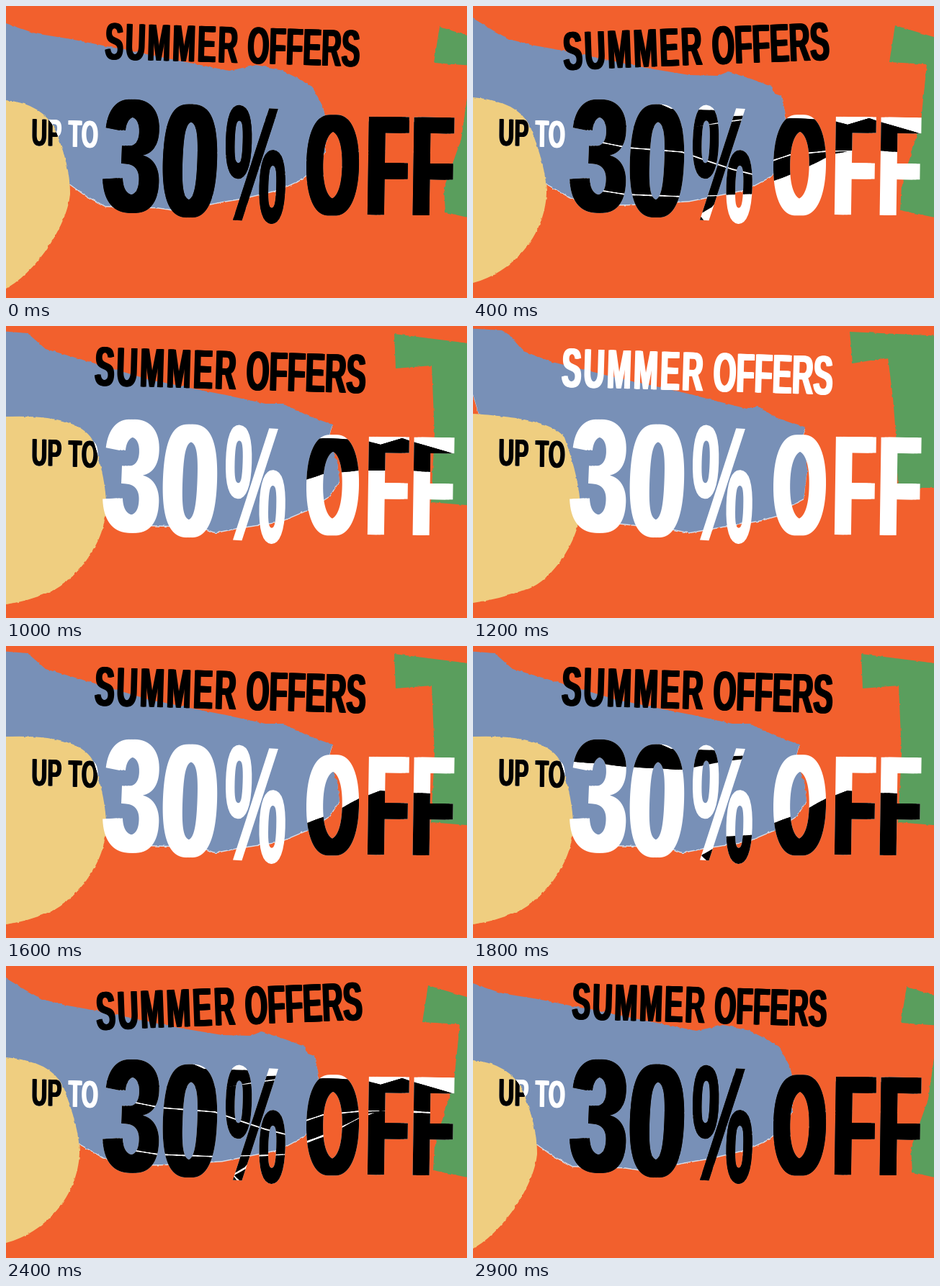
These frames come from a looping animation (640 by 406 pixels, 3000 ms). An HTML page without scripts:

```html
<!DOCTYPE html>
<html lang="en">
<head>
<meta charset="utf-8">
<title>Summer offers</title>
<style>
  html, body { margin: 0; height: 100%; overflow: hidden; background: #f2602d; }
  svg { display: block; width: 100vw; height: 100vh; }
  text { font-family: "Liberation Sans", Arial, sans-serif; font-weight: 700; fill: currentColor; }
  .black { color: #000; }
  .white { color: #fff; }
  .blue { fill: #7890b7; }
  .yellow { fill: #efce80; }
  .green { fill: #5a9e5d; }
  .edge { fill: #d9dde8; }

  .pose, .strip, .solid { visibility: hidden; animation: 3s step-end infinite; }

  /* paper poses: out to the right, then back */
  .p1 { animation-name: p1; }
  .p2 { animation-name: p2; }
  .p3 { animation-name: p3; }
  .p4 { animation-name: p4; }
  .p5 { animation-name: p5; }
  @keyframes p1 { 0%, 86.66% { visibility: visible } 6.66% { visibility: hidden } }
  @keyframes p2 { 0%, 20%, 86.66% { visibility: hidden } 6.66%, 73.33% { visibility: visible } }
  @keyframes p3 { 0%, 33.33%, 73.33% { visibility: hidden } 20%, 66.66% { visibility: visible } }
  @keyframes p4 { 0%, 40%, 66.66% { visibility: hidden } 33.33%, 53.33% { visibility: visible } }
  @keyframes p5 { 0%, 53.33% { visibility: hidden } 40% { visibility: visible } }

  /* black strips of the big lettering: torn off, then put back */
  .solid { animation-name: solid; }
  .a { animation-name: a; }
  .b { animation-name: b; }
  .c { animation-name: c; }
  .d { animation-name: d; }
  .e { animation-name: e; }
  .f { animation-name: f; }
  .g { animation-name: g; }
  .h { animation-name: h; }
  @keyframes solid { 0%, 96.66% { visibility: visible } 6.66% { visibility: hidden } }
  @keyframes a { 0%, 60% { visibility: visible } 20% { visibility: hidden } }
  @keyframes b { 0%, 80% { visibility: visible } 30% { visibility: hidden } }
  @keyframes c { 0%, 73.33% { visibility: visible } 26.66% { visibility: hidden } }
  @keyframes d { 0%, 66.66% { visibility: visible } 33.33% { visibility: hidden } }
  @keyframes e { 0%, 56.66% { visibility: visible } 10% { visibility: hidden } }
  @keyframes f { 0%, 76.66% { visibility: visible } 40% { visibility: hidden } }
  @keyframes g { 0%, 73.33% { visibility: visible } 20% { visibility: hidden } }
  @keyframes h { 0%, 53.33% { visibility: visible } 13.33% { visibility: hidden } }
</style>
</head>
<body>
<svg viewBox="0 0 640 406">
  <defs>
    <filter id="torn" filterUnits="userSpaceOnUse" x="-20" y="-20" width="680" height="446" color-interpolation-filters="sRGB">
      <feTurbulence type="fractalNoise" baseFrequency=".14" numOctaves="2" seed="4"/>
      <feDisplacementMap in="SourceGraphic" scale="3" xChannelSelector="R" yChannelSelector="G"/>
    </filter>

    <!-- each word is laid three times side by side for heavier stems -->
    <text id="num" font-size="222" text-anchor="middle" x="0 126" transform="matrix(.635 .054 -.04 1 172.5 285)">30</text>
    <text id="off" font-size="198" text-anchor="middle" x="0 166 303" transform="matrix(.458 .005 -.015 1 452.5 289.5)">OFF</text>
    <text id="upto" font-size="53" letter-spacing="1" word-spacing="2" transform="matrix(.555 .022 -.01 1 35.5 193.5)">UP TO</text>
    <text id="summer" font-size="77" text-anchor="middle" transform="scale(.527 1)"><tspan letter-spacing="6">SUMMER</tspan> <tspan letter-spacing=".5">OFFERS</tspan></text>

    <g id="big">
      <use href="#num" x="-4"/><use href="#num"/><use href="#num" x="4"/>
      <text font-size="223" text-anchor="middle" stroke="currentColor" stroke-width="5" transform="matrix(.44 .03 -.03 1 344 297)">%</text>
      <use href="#off" x="-5"/><use href="#off"/><use href="#off" x="5"/>
    </g>
    <g id="small"><use href="#upto" x="-.9"/><use href="#upto"/><use href="#upto" x=".9"/></g>
    <g id="title"><use href="#summer" x="-1.4"/><use href="#summer"/><use href="#summer" x="1.4"/></g>

    <path id="b1" d="M-9 20L0 24 40 38 90 46 135 55 250 78 310 90 347 82 380 88 400 98 425 112 432 125 440 140 446 165 443 202 430 226 412 240 380 255 330 267 300 272 260 280 230 283 210 280 138 278 110 263 88 247-9 200Z"/>
    <path id="b2" d="M-9 13L0 17 28 34 50 46 80 54 125 62 240 86 300 96 340 97 355 91 388 102 415 112 419 122 428 125 434 150 431 205 415 236 380 255 300 271 215 276 170 276 135 266 100 246-9 200Z"/>
    <path id="b3" d="M-9 -4L0 0 15 8 45 30 80 50 120 60 200 78 290 97 360 108 378 104 415 120 447 136 445 152 462 205 455 230 437 241 425 258 380 277 330 286 290 289 265 282 160 265 120 247-9 200Z"/>
    <path id="b4" d="M-9 7L30 10 55 32 110 48 200 75 300 95 360 108 385 108 420 125 453 137 448 155 460 190 463 215 450 236 420 255 380 272 320 281 290 287 270 279 200 277 160 265 138 250-9 200Z"/>
    <path id="b5" d="M-9 3L40 6 50 12 70 35 110 50 200 72 290 92 380 115 395 111 420 127 462 142 458 152 464 200 459 240 440 250 428 262 400 270 340 280 300 287 275 282 210 275 180 272 147 255 60 200 8 122 0 95-9 70Z"/>

    <path id="y1" d="M-9 130L0 131Q52 136 69 174 89 222 89 260C87 300 45 368 0 393H-9Z"/>
    <path id="y2" d="M-9 127H0Q62 132 79 167 102 225 102 260C100 320 54 371 0 385H-9Z"/>
    <path id="y3" d="M-9 125H0Q86 124 102 164 121 215 121 250C121 315 65 384 0 391H-9Z"/>
    <path id="y4" d="M-9 126H0Q104 122 122 162 139 214 139 250C139 305 92 358 60 370Q30 383 0 387H-9Z"/>
    <path id="y5" d="M-9 122H0C40 125 110 130 127 155Q149 216 149 255C148 300 105 362 68 368Q40 379 0 385H-9Z"/>

    <clipPath id="on1"><use href="#y1"/></clipPath>
    <clipPath id="on2"><use href="#y2"/></clipPath>
    <clipPath id="on3"><use href="#y3"/></clipPath>
    <clipPath id="on4"><use href="#y4"/></clipPath>
    <clipPath id="on5"><use href="#y5"/></clipPath>

    <clipPath id="sa"><path d="M100 100L240 128 275 143 340 145 362 153 400 152V154L345 161 290 172 212 168 180 164 100 158Z"/></clipPath>
    <clipPath id="sb"><path d="M100 156L180 162 212 166 290 170 345 163 400 155V236L360 226 330 216 290 202 215 196 180 189 100 181Z"/></clipPath>
    <clipPath id="sc"><path d="M100 183L180 191 215 198 290 204 330 218 360 228 400 238V261L336 263 290 264 212 261 180 256 165 247 100 246Z"/></clipPath>
    <clipPath id="sd"><path d="M100 245L165 246 180 258 212 263 290 266 346 264 331 280 314 290 322 300 304 310H100Z"/></clipPath>
    <clipPath id="se"><path d="M348 265L400 262V310H325L324 298 317 291 333 282Z"/></clipPath>
    <clipPath id="sf"><path d="M410 166L425 157 440 156 495 158 520 165 550 156 575 164 630 180V196L590 203 560 201 490 201 440 206 410 216Z"/></clipPath>
    <clipPath id="sg"><path d="M410 218L440 208 490 203 520 202 500 206 450 231 410 246Z"/></clipPath>
    <clipPath id="sh"><path d="M410 249L450 234 490 212 520 201 560 204 590 205 630 198V310H410Z"/></clipPath>
  </defs>

  <g class="pose p1">
    <g filter="url(#torn)">
      <use class="edge" href="#b1" y="1.5"/><use class="blue" href="#b1"/><use class="yellow" href="#y1"/>
      <path class="green" d="M602 29L650 44V83L594 79ZM650 110L640 128 632 185 608 253 610 287 650 296Z"/>
    </g>
    <use class="white" href="#small"/>
    <g clip-path="url(#on1)"><use class="black" href="#small"/></g>
    <use class="black" href="#title" transform="translate(314 79) rotate(1.7) scale(.94)"/>
  </g>

  <g class="pose p2">
    <g filter="url(#torn)">
      <use class="edge" href="#b2" y="1.5"/><use class="blue" href="#b2"/><use class="yellow" href="#y2"/>
      <path class="green" d="M586 27L650 46V296L593 284 595 250 622 160 630 81 578 78Z"/>
    </g>
    <use class="white" href="#small"/>
    <g clip-path="url(#on2)"><use class="black" href="#small"/></g>
    <use class="black" href="#title" transform="translate(311 82) rotate(-2.2) scale(.982)"/>
  </g>

  <g class="pose p3">
    <g filter="url(#torn)">
      <use class="edge" href="#b3" y="1.5"/><use class="blue" href="#b3"/><use class="yellow" href="#y3"/>
      <path class="green" d="M573 16L650 39V274L598 267 606 200 617 150 621 68 569 65Z"/>
    </g>
    <use class="white" href="#small"/>
    <g clip-path="url(#on3)"><use class="black" href="#small"/></g>
    <use class="black" href="#title" transform="translate(308 87) rotate(-2.3)"/>
  </g>

  <g class="pose p4">
    <g filter="url(#torn)">
      <use class="edge" href="#b4" y="1.5"/><use class="blue" href="#b4"/><use class="yellow" href="#y4"/>
      <path class="green" d="M539 11L650 25V250L590 245 595 150 591 55 541 59Z"/>
    </g>
    <use class="white" href="#small"/>
    <g clip-path="url(#on4)"><use class="black" href="#small"/></g>
    <use class="black" href="#title" transform="translate(311 88) rotate(1.7)"/>
  </g>

  <g class="pose p5">
    <g filter="url(#torn)">
      <use class="edge" href="#b5" y="1.5"/><use class="blue" href="#b5"/><use class="yellow" href="#y5"/>
      <path class="green" d="M523 8L650 14V225H590L587 150 583 100 576 44 527 52Z"/>
    </g>
    <use class="white" href="#small"/>
    <g clip-path="url(#on5)"><use class="black" href="#small"/></g>
    <use class="white" href="#title" transform="translate(311 90) rotate(1.7)"/>
  </g>

  <use class="white" href="#big"/>
  <g class="black">
    <g class="strip a" clip-path="url(#sa)"><use href="#big"/></g>
    <g class="strip b" clip-path="url(#sb)"><use href="#big"/></g>
    <g class="strip c" clip-path="url(#sc)"><use href="#big"/></g>
    <g class="strip d" clip-path="url(#sd)"><use href="#big"/></g>
    <g class="strip e" clip-path="url(#se)"><use href="#big"/></g>
    <g class="strip f" clip-path="url(#sf)"><use href="#big"/></g>
    <g class="strip g" clip-path="url(#sg)"><use href="#big"/></g>
    <g class="strip h" clip-path="url(#sh)"><use href="#big"/></g>
    <use class="solid" href="#big"/>
  </g>
</svg>
</body>
</html>
```
